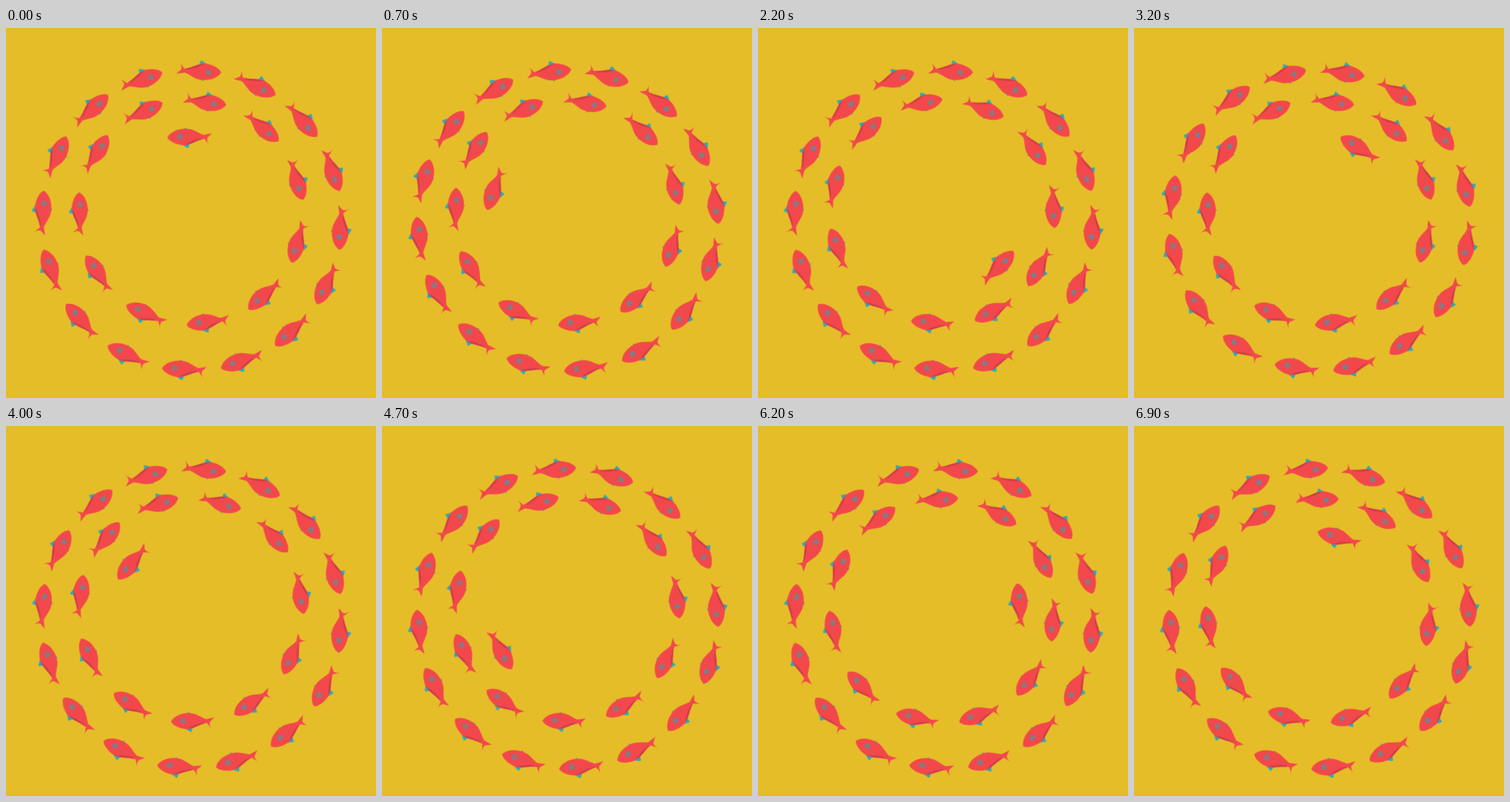
Animation, 480 px wide and 480 px high, one loop 7000 ms. Source, as an HTML page without scripts:

```html
<!DOCTYPE html>
<html lang="en">
<head>
<meta charset="utf-8">
<title>Circling fish</title>
<style>
  html, body { margin: 0; width: 100%; height: 100%; overflow: hidden; background: #e5bd28; }
  svg { display: block; width: 100%; height: 100%; }

  /* --unit is the smallest turn; each 200 ms covers seven of them, as three then four */
  .ring { --unit: 1.46deg; }
  .back { --unit: -2.92deg; }
  .swim { animation: swim 7s steps(35) -10ms infinite; }
  .beat { animation: beat 200ms step-end -10ms infinite; }
  @keyframes swim {
    from { transform: rotate(0deg); }
    to { transform: rotate(calc(var(--unit) * 245)); }
  }
  @keyframes beat {
    0% { transform: rotate(0deg); }
    50%, 100% { transform: rotate(calc(var(--unit) * 3)); }
  }

  .skin { fill: #f2484b; }
  .shade { fill: #c93f48; }
  .fin { fill: #27aabb; }
  .eye { fill: #b3686f; stroke: #71838f; stroke-width: 1.8; }
</style>
</head>
<body>
<svg viewBox="0 0 480 480">
  <defs>
    <!-- faces right, back fin up -->
    <g id="fish">
      <path class="fin" d="M0-8L2-14 4-13 12-8ZM3 10L5 13 8 10Z"/>
      <path class="skin" d="M29 .5C27-4 19-9 8-10C-1-10-9-4-19-2L-25-9.500Q-22-5-23-1Q-26 2-29 5L-18 3C-10 6-5 11 4 11.500C14 12 25 8 29 .5Z"/>
      <path class="shade" d="M-16-2C-8-4-3-9 7-9.500C2-7-4-3-16-1Z"/>
      <circle class="eye" cx="12.500" cy="1.500" r="2.600"/>
    </g>

    <use id="outer1" href="#fish" y="-194"/>
    <g id="outer2"><use href="#outer1"/><use href="#outer1" transform="rotate(22.5)"/></g>
    <g id="outer4"><use href="#outer2"/><use href="#outer2" transform="rotate(45)"/></g>
    <g id="outer8"><use href="#outer4"/><use href="#outer4" transform="rotate(90)"/></g>

    <use id="inner1" href="#fish" transform="translate(0 -144.5) scale(.97)"/>
    <g id="inner2"><use href="#inner1"/><use href="#inner1" transform="rotate(32.727)"/></g>
    <g id="inner4"><use href="#inner2"/><use href="#inner2" transform="rotate(65.455)"/></g>
  </defs>

  <g class="ring" transform="translate(240.8 249.5) rotate(2.8)">
    <g class="swim"><g class="beat">
      <use href="#outer8"/>
      <use href="#outer8" transform="rotate(180)"/>
    </g></g>
  </g>

  <g class="ring" transform="translate(239.5 239) rotate(7.3)">
    <g class="swim"><g class="beat">
      <use href="#inner4"/>
      <use href="#inner4" transform="rotate(130.909)"/>
      <use href="#inner2" transform="rotate(261.818)"/>
      <use href="#inner1" transform="rotate(327.273)"/>
    </g></g>
  </g>

  <g class="back" transform="translate(240 241) rotate(-1)">
    <g class="swim"><g class="beat">
      <use href="#fish" transform="translate(0 -99) rotate(180)"/>
    </g></g>
  </g>
</svg>
</body>
</html>
```
